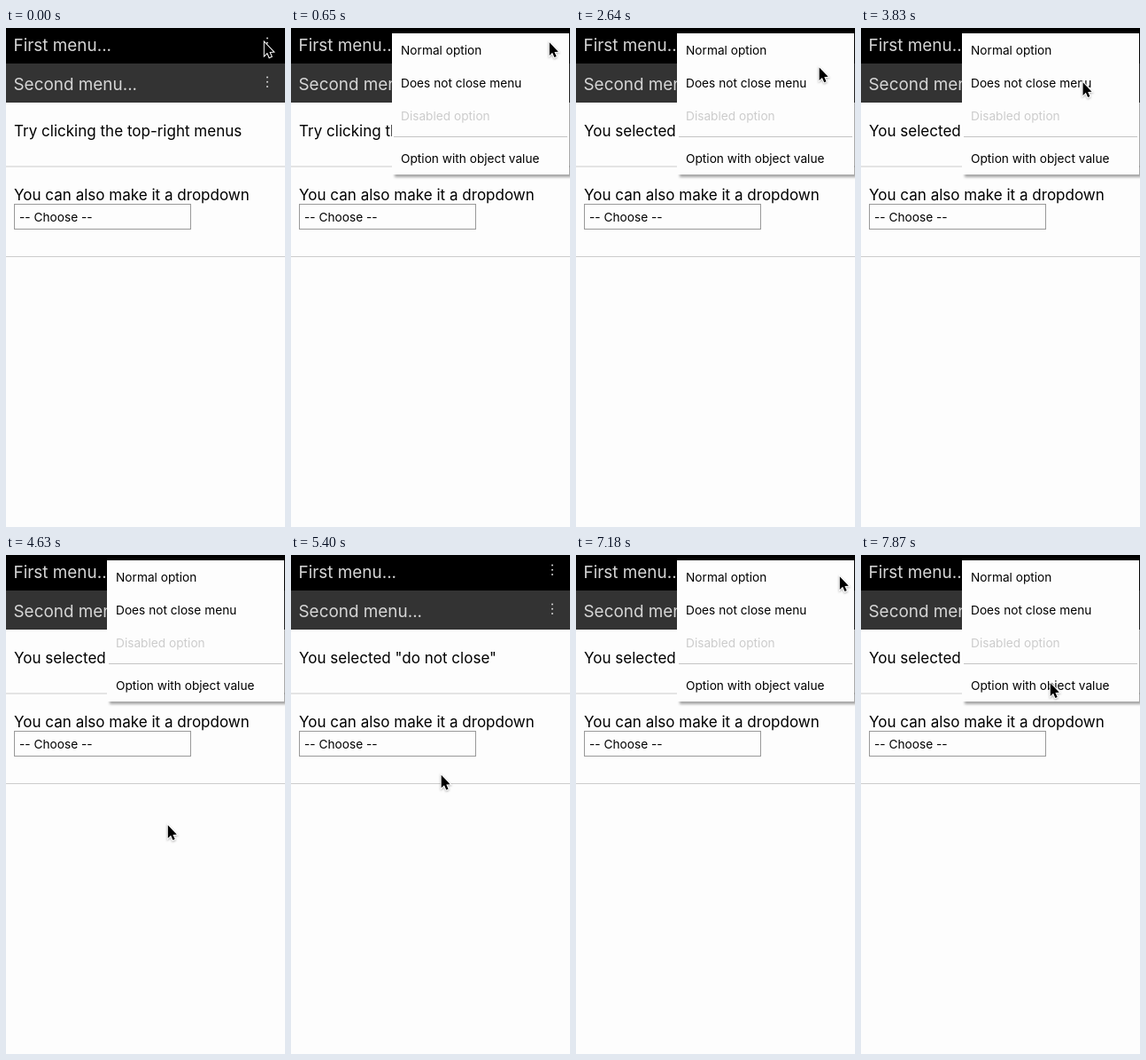
Animation of 315 by 562 pixels, one loop 8000 ms. Source, as an HTML page:

```html
<!DOCTYPE html>
<html lang="en">
<head>
<meta charset="utf-8">
<title>Popup menus</title>
<style>
  html, body { margin: 0; width: 100%; height: 100%; overflow: hidden; background: #fdfdfd; }
  svg { display: block; width: 315px; height: 562px; font-family: Inter, "Liberation Sans", sans-serif; cursor: default; }
  .title { font-size: 18.9px; fill: #d6d6d6; }
  .body { font-size: 17.05px; }
  .option { font-size: 13.7px; }
  .panel { fill: #fdfdfd; filter: drop-shadow(3px 3px 1.5px rgba(0, 0, 0, .35)); }
  .dots { stroke: #d6d6d6; stroke-width: 2; stroke-linecap: round; stroke-dasharray: 0 5.25; }
  #cursor { stroke: #fff; stroke-width: 2; paint-order: stroke; filter: drop-shadow(0 1px 1px rgba(0, 0, 0, .3)); }
</style>
</head>
<body>
<svg viewBox="0 0 315 562">
  <rect width="315" height="40"/>
  <rect y="40" width="315" height="44" fill="#333"/>
  <text class="title" x="8.5" y="25.5">First menu...</text>
  <text class="title" x="8.5" y="69.5">Second menu...</text>
  <path class="dots" d="M295 11.5v10.6M295 55.5v10.6"/>
  <text class="body" id="message" x="9" y="121.5"></text>
  <path d="M0 156H315M0 257.5H315" stroke="#ccc"/>
  <text class="body" x="9" y="194">You can also make it a dropdown</text>
  <rect x="9.5" y="198.5" width="199" height="28" fill="#fdfdfd" stroke="#999"/>
  <text class="option" x="15" y="217.5">-- Choose --</text>

  <g id="menu">
    <rect class="panel" x="114" y="6" width="200" height="159"/>
    <path d="M116 122.5H312" stroke="#c4c4c4"/>
    <g class="option">
      <text x="124" y="29.5">Normal option</text>
      <text x="124" y="66.5">Does not close menu</text>
      <text x="124" y="103.5" fill="#ccc">Disabled option</text>
      <text x="124" y="151.5">Option with object value</text>
    </g>
  </g>

  <path id="cursor" d="M0 0V14.6L3.3 11.5L5.6 16.8L7.9 15.8L5.6 10.7L10 10.4Z"/>
</svg>
<script>
const LOOP = 8000, FRAME = 56, GROW = 60;
const [message, menu, cursor] = ['message', 'menu', 'cursor'].map(id => document.getElementById(id));

// Each time the menu is shown, and the message it leaves behind
const visits = [
  { open: 590, close: 1360, result: 'You selected "normal"' },
  { open: 2310, close: 4930, result: 'You selected "do not close"' },
  { open: 7120, close: LOOP }
];

// Pointer waypoints: time of leaving, time of arrival, place
const start = [291, 15];
const moves = [
  [1070, 1190, 279, 25],
  [1960, 2070, 294, 23],
  [2540, 2930, 257, 60],
  [3830, 3940, 241, 60],
  [4360, 4630, 182, 303],
  [5400, 5850, 138, 113],
  [6090, 6250, 190, 114],
  [6490, 6600, 282, 43],
  [6660, 6950, 297, 23],
  [7290, 7640, 220, 169],
  [7700, 7870, 213, 143]
];

// Eased progress, in whole screen frames; longer moves brake harder
function progress(t, from, to) {
  const gaps = Math.round((to - from) / FRAME);
  const step = Math.floor((t - from) / (to - from) * gaps + 1e-6) + 1;
  const left = Math.max(0, 1 - step / (gaps + 1));
  return 1 - left ** (1 + (to - from) / 225);
}

function pointerAt(t) {
  let [x, y] = start;
  for (const [from, to, toX, toY] of moves) {
    if (t < from) break;
    const p = progress(t, from, to);
    x += (toX - x) * p;
    y += (toY - y) * p;
  }
  return [x, y];
}

function draw(t) {
  const [x, y] = pointerAt(t);
  cursor.setAttribute('transform', `translate(${x + .8} ${y + 1.3})`);

  const past = visits.filter(v => v.close <= t).pop();
  message.textContent = past ? past.result : 'Try clicking the top-right menus';

  const current = visits.find(v => v.open <= t && t < v.close);
  menu.style.display = current ? '' : 'none';
  if (current) {
    const scale = Math.min(1, Math.max(.01, (t - current.open) / GROW));
    menu.setAttribute('transform', `translate(214 85.5) scale(${scale}) translate(-214 -85.5)`);
  }
}

const begin = performance.now();
function tick() {
  draw((performance.now() - begin) % LOOP);
  requestAnimationFrame(tick);
}
tick();
</script>
</body>
</html>
```
